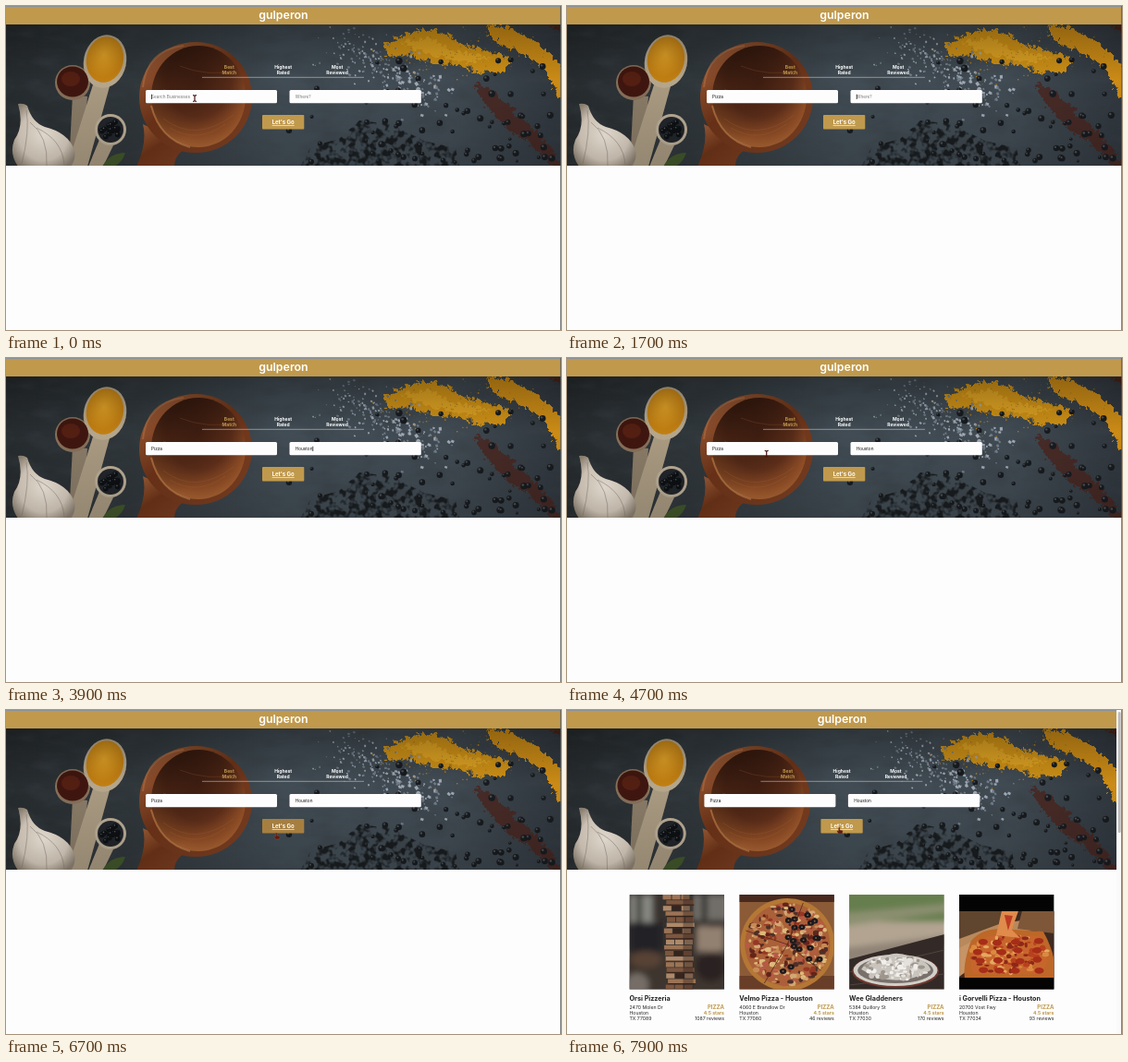
Write an HTML page that moves like this. It is 600 by 351 pixels and loops after 8000 ms.

```html
<!DOCTYPE html>
<html lang="en">
<head>
<meta charset="utf-8">
<title>Restaurant search</title>
<style>
  html, body { margin: 0; width: 100%; height: 100%; overflow: hidden; background: #fdfdfd; }
  svg { display: block; width: 100%; height: 100%; font-family: Inter, "Open Sans", sans-serif; }
  .mid { text-anchor: middle; }
  .end { text-anchor: end; }
  .bold { font-weight: 700; }
  .gold { fill: #c0994c; }
</style>
</head>
<body>
<svg viewBox="0 0 600 351" preserveAspectRatio="none">
  <defs>
    <linearGradient id="slate">
      <stop offset="0" stop-color="#262b2e"/><stop offset=".25" stop-color="#30373b"/>
      <stop offset=".5" stop-color="#414c54"/><stop offset=".8" stop-color="#414b53"/>
      <stop offset="1" stop-color="#2f363d"/>
    </linearGradient>
    <linearGradient id="shade" x2="0" y2="1">
      <stop offset="0" stop-color="#000" stop-opacity=".28"/><stop offset=".4" stop-color="#000" stop-opacity="0"/>
      <stop offset="1" stop-color="#000" stop-opacity=".12"/>
    </linearGradient>
    <radialGradient id="bowl" cx=".5" cy=".36" r=".68">
      <stop offset="0" stop-color="#4f2615"/><stop offset=".5" stop-color="#65321c"/>
      <stop offset=".8" stop-color="#935027"/><stop offset="1" stop-color="#b06a38"/>
    </radialGradient>
    <linearGradient id="bowlShadow" x1=".15" y1="0" x2=".6" y2=".8">
      <stop offset="0" stop-color="#210f09" stop-opacity=".85"/><stop offset="1" stop-color="#210f09" stop-opacity="0"/>
    </linearGradient>
    <linearGradient id="rim" x2=".8" y2="1">
      <stop offset="0" stop-color="#a0603a"/><stop offset=".5" stop-color="#6c3318"/><stop offset="1" stop-color="#7b3f22"/>
    </linearGradient>
    <radialGradient id="garlic" cx=".5" cy=".5" r=".6">
      <stop offset="0" stop-color="#f0e8dc"/><stop offset=".65" stop-color="#d5cabc"/><stop offset="1" stop-color="#8b8071"/>
    </radialGradient>
    <radialGradient id="turmeric" cx=".45" cy=".4">
      <stop offset="0" stop-color="#e2a227"/><stop offset="1" stop-color="#c17f12"/>
    </radialGradient>
    <filter id="grain" x="0" y="0" width="1" height="1">
      <feTurbulence type="fractalNoise" baseFrequency=".025 .06" numOctaves="4" seed="4"/>
      <feColorMatrix values="0 0 0 0 .04  0 0 0 0 .05  0 0 0 0 .06  1.2 0 0 0 -.5"/>
    </filter>
    <filter id="crumble">
      <feTurbulence baseFrequency=".13" numOctaves="3" seed="8"/>
      <feDisplacementMap in="SourceGraphic" scale="11" xChannelSelector="R" yChannelSelector="G"/>
    </filter>
    <filter id="mottle">
      <feTurbulence type="fractalNoise" baseFrequency=".14" numOctaves="2" seed="3"/>
      <feColorMatrix values="0 0 0 0 0  0 0 0 0 0  0 0 0 0 0  5 0 0 0 -2.2"/>
      <feComposite in="SourceGraphic" operator="in"/>
    </filter>
    <filter id="blur"><feGaussianBlur stdDeviation="3"/></filter>
    <clipPath id="heroClip"><rect y="20" width="600" height="153"/></clipPath>
    <clipPath id="photoClip"><rect width="102.5" height="102.5"/></clipPath>
  </defs>

  <rect width="600" height="351" fill="#fdfdfd"/>
  <g id="hero"><g clip-path="url(#heroClip)">
    <rect y="20" width="600" height="153" fill="url(#slate)"/>
    <rect y="20" width="600" height="153" filter="url(#grain)"/>
    <path d="M318 174l12-22 30-8 22-20 34 4 36 18 34 8 4 20z" filter="url(#mottle)" opacity=".6"/>
    <g filter="url(#crumble)">
      <path d="M408 40l17-10 20-7 27 4 20 13 28 6 25 9-8 14-31 1-21-9-27-1-27-10-22 2z" fill="#cd9015"/>
      <path d="M425 37l30-5 24 14 44 8-20 5-47-9z" fill="#dca123"/>
      <path d="M516 18l26 3 28 14 20 18 16 21v34l-13-16-13-24-24-19-20-7-16-12z" fill="#cb8b13"/>
      <path d="M586 18h20v12z" fill="#4b2119"/>
      <path d="M504 80l22 10 26 26 25 24 27 32h-14l-29-28-26-16-24-30z" fill="#4b221a" opacity=".75"/>
    </g>
    <g id="grains"></g>

    <path d="M148 128q5 20-7 46h41q0-16 18-21z" fill="url(#rim)"/>
    <ellipse cx="205" cy="99" rx="61" ry="60" fill="url(#rim)"/>
    <ellipse cx="208" cy="98" rx="51" ry="55" fill="url(#bowl)"/>
    <ellipse cx="208" cy="98" rx="51" ry="55" fill="url(#bowlShadow)"/>
    <g fill="none" stroke="#c07440" opacity=".2">
      <path d="M170 122q35 27 76-4M177 132q30 18 60-4M188 65q30 12 60 5M170 90q40 17 85 5"/>
    </g>
    <path d="M148 88q4-40 44-45" fill="none" stroke="#ad7048" stroke-width="2" opacity=".6"/>
    <path d="M157 108q9 36 42 45" fill="none" stroke="#c98751" stroke-width="2" opacity=".6"/>

    <g id="spoons">
      <path d="M72 96L88 98 82 174H68z" fill="#897b67"/>
      <path d="M95 82L112 87 88 174H66z" fill="#a99a81"/>
      <ellipse cx="72" cy="83" rx="19" ry="19" fill="#86705a"/>
      <ellipse cx="107" cy="60" rx="23" ry="29" fill="#b5a68c" transform="rotate(12 107 60)"/>
      <path d="M101 145L116 151 105 174H89z" fill="#a6977f"/>
      <circle cx="113" cy="134" r="17" fill="#b9ac96"/>
    </g>
    <use href="#spoons" filter="url(#mottle)" opacity=".35"/>
    <ellipse cx="72" cy="82" rx="17" ry="16.5" fill="#3f160f"/>
    <ellipse cx="70" cy="79" rx="10" ry="8" fill="#541f13"/>
    <ellipse cx="107" cy="58" rx="20" ry="25" fill="url(#turmeric)" transform="rotate(12 107 58)"/>
    <circle cx="113" cy="134" r="14" fill="#22252a"/>
    <g id="corns"></g>
    <path d="M104 174q8-15 25-15-4 12-13 15z" fill="#40552b"/>
    <path d="M13 106q6-1 10 2 5 18 19 23 25 6 32 25 2 12-5 19H14Q3 161 9 145q11-15 4-39z" fill="url(#garlic)"/>
    <path d="M22 113q4 22-5 58M26 126q20 15 18 48M33 132q28 13 30 40" fill="none" stroke="#82766a" opacity=".5"/>
    <rect y="20" width="600" height="153" fill="url(#shade)"/>
  </g></g>

  <rect id="header" class="gold" width="600" height="20"/>
  <rect width="600" height="1" fill="#88929a"/>

  <g id="form">
    <text class="mid" x="300" y="14" font-size="12.4" font-weight="600" fill="#fff">gulperon</text>
    <g id="tabs" class="mid bold" font-size="5" fill="#fff"></g>
    <path d="M212 77.3H387" stroke="#fff" stroke-width=".7" opacity=".6"/>
    <g fill="#fdfdfd"><rect x="151" y="91" width="142" height="14.3" rx="1.5"/><rect x="306.5" y="91" width="142.3" height="14.3" rx="1.5"/></g>
    <g font-size="4.7"><text id="term" x="157" y="100"/><text id="place" x="312.8" y="100"/></g>
    <rect id="caret" y="95.7" width=".8" height="5.3" fill="#222"/>
    <rect id="button" x="277" y="118" width="45.3" height="15.5" rx="1"/>
    <text class="mid bold" x="299.7" y="128" font-size="6" fill="#fff" text-decoration="underline">Let's Go</text>
  </g>

  <g id="results"></g>
  <g id="scrollbar">
    <rect x="594" width="6" height="351" fill="#fafafa"/>
    <rect x="595.7" y="2" width="3" height="131" rx="1.5" fill="#bcbcbc"/>
  </g>
  <path d="M599.6 0V351" stroke="#55585a" stroke-width=".8"/>
  <path id="beam" d="M-2-3.3Q0-3.3 0-2.2 0-3.3 2-3.3M0-2.2V2.2M-2 3.3Q0 3.3 0 2.2 0 3.3 2 3.3" fill="none" stroke="#481412" stroke-width="1.2"/>
  <path id="hand" d="M-1.5-3.5q1-1 1.4 0V-1l2.6.6q.8.3.6 1.2L2.5 3h-4L-3.1.4q0-1 1.6-.2z" fill="#5b1c14" stroke="#a4673c" stroke-width=".3"/>
</svg>

<script>
const $ = id => document.getElementById(id);
const LOOP = 8000;
const RESULTS_AT = 7000;

function seeded(seed) {
  return () => (seed = (seed * 16807) % 2147483647) / 2147483647;
}
const repeat = (count, draw) => Array.from({ length: count }, (_, i) => draw(i)).join('');
const rect = (x, y, w, h, fill, extra = '') =>
  `<rect x="${x}" y="${y}" width="${w}" height="${h}" fill="${fill}" ${extra}/>`;
const dot = (x, y, r, fill, ry = r) =>
  `<ellipse cx="${x}" cy="${y}" rx="${r}" ry="${ry}" fill="${fill}"/>`;
const shape = (d, fill, extra = '') => `<path d="${d}" fill="${fill}" ${extra}/>`;
const blurred = content => `<g filter="url(#blur)">${content}</g>`;

function scatterSpices() {
  const rnd = seeded(719);
  const bell = () => rnd() + rnd() + rnd() - 1.5;
  const salt = repeat(240, () => {
    const along = rnd();
    const x = 365 + along * 98 + bell() * 30, y = 42 + along * 58 + bell() * 24;
    const s = 1 + rnd() * (1.4 + along * 2);
    return rect(x, y, s, s * 0.8, rnd() > 0.4 ? '#9ea8b4' : '#717c88', `transform="rotate(${rnd() * 90} ${x} ${y})"`);
  });
  const pepper = repeat(75, () => {
    const x = 270 + 325 * Math.sqrt(rnd()), y = 32 + 138 * Math.sqrt(rnd()), r = 1.5 + rnd() * 2.3;
    return dot(x, y, r, '#171b1f') + dot(x - r * 0.3, y - r * 0.35, r * 0.35, '#4a4d50');
  });
  const dust = repeat(100, () => dot(490 + bell() * 80, 55 + bell() * 28, 0.3 + rnd() * 0.6, '#ad7b20'));
  $('grains').innerHTML = salt + dust + pepper;
  $('corns').innerHTML = repeat(22, () => {
    const a = rnd() * 6.3, d = rnd() * 11, x = 113 + d * Math.cos(a), y = 134 + d * Math.sin(a);
    return dot(x, y, 2.8, '#0e1114') + dot(x - 0.8, y - 1, 0.8, '#56585a');
  });
}

function towerPhoto() {
  const rnd = seeded(45);
  const room = rect(0, 0, 103, 103, '#38322f') + blurred(
    rect(0, 0, 26, 30, '#85867f') + rect(8, 0, 5, 34, '#2b2827') + rect(68, 0, 40, 28, '#716e69') +
    rect(78, 0, 6, 45, '#332d2b') + rect(0, 30, 36, 32, '#242225') + rect(72, 34, 31, 28, '#92806f') +
    rect(0, 66, 103, 40, '#3d342e') + dot(18, 70, 17, '#594334', 9) + dot(88, 78, 16, '#292322') + dot(8, 98, 13, '#756d66'));
  return room + repeat(17, i => {
    const y = i * 6.1, x = 36 + i * 0.15 + rnd() * 4;
    const tone = ['#9b7355', '#7d563f', '#ad896a'][i % 3];
    return i % 2
      ? rect(x, y, 30, 5.5, tone) + rect(x, y + 4.5, 30, 1.2, '#38251c')
      : repeat(3, k => rect(x + k * 10, y, 9, 5.3, k === 1 && i % 4 ? '#35251d' : tone));
  }) + rect(58, 0, 11, 103, '#261b17', 'opacity=".35"');
}

function toppings(rnd, cx, cy, radius, count, colors, squash = 1) {
  return repeat(count, i => {
    const a = rnd() * 6.3, d = radius * Math.sqrt(rnd());
    return dot(cx + d * Math.cos(a), cy + d * Math.sin(a) * squash, 1 + rnd() * 3, colors[i % colors.length], 1 + rnd() * 2);
  });
}

function olivePhoto() {
  const rnd = seeded(87);
  return rect(0, 0, 103, 103, '#8b5a37') + rect(0, 0, 103, 8, '#48291d') + rect(0, 88, 103, 15, '#693e28') +
    dot(52, 54, 51, '#b47735', 50) + dot(52, 54, 46, '#aa6038', 45) +
    toppings(rnd, 52, 54, 44, 310, ['#ddba7b', '#953724', '#c68b56', '#642419', '#d3a675', '#b75a45', '#4d3028']) +
    repeat(20, () => {
      const a = rnd() * 6.3, d = 39 * Math.sqrt(rnd()), x = 52 + d * Math.cos(a), y = 53 + d * Math.sin(a);
      return dot(x, y, 3.6, '#1c191d', 3) + dot(x, y, 0.9, '#876448');
    }) +
    shape('M52 54L7 39M52 54L27 96M52 54L88 82M52 54L69 9', 'none', 'stroke="#50281c" stroke-width=".8"');
}

function platePhoto() {
  const rnd = seeded(31);
  return rect(0, 0, 103, 103, '#b2a491') +
    blurred(rect(-5, -5, 113, 34, '#667e4e') + shape('M-5 20L108 10V18L-5 34z', '#8c9071') +
      shape('M-5 58L108 44V55L-5 74z', '#8f8376')) +
    shape('M0 70L103 43V103H0z', '#332a27') +
    shape('M0 84L103 60M0 98L103 86', 'none', 'stroke="#51443d"') +
    dot(50, 83, 47, '#70382f', 18) + dot(50, 82, 45.5, '#d3cfc9', 17) + dot(50, 82, 41, '#78706a', 14) +
    shape('M13 81Q21 68 37 68 50 60 65 67 87 72 88 82 50 104 13 81z', '#c9c5be') +
    toppings(rnd, 50, 80, 34, 120, ['#f1efec', '#9e968d', '#e5e1dc', '#c9c3bc'], 0.38);
}

function boxPhoto() {
  const rnd = seeded(63);
  return rect(0, 0, 103, 103, '#050404') + rect(0, 18, 103, 72, '#3d2a21') +
    shape('M0 18H49L39 39 0 52z', '#60452f') + shape('M0 48L43 32 103 22V33L60 43 0 61z', '#b8895c') +
    shape('M68 18H103V42L63 37z', '#7e5739') + shape('M0 58L13 51 8 83 0 89z', '#c59467') +
    shape('M13 50Q24 37 46 37L91 40Q100 56 103 72V90H6Q4 74 13 50z', '#bd6728') +
    shape('M17 53Q30 42 51 43L86 45 96 72 88 86H15Q9 72 17 53z', '#c7662c') +
    toppings(rnd, 54, 65, 42, 125, ['#db8b40', '#b9401e', '#e5a861', '#8d2818'], 0.5) +
    repeat(16, i => dot(20 + (i % 4) * 20 + rnd() * 7, 50 + (i >> 2) * 10 + rnd() * 3, 5, '#a62d18', 3.3)) +
    shape('M46 18H64L57 38 66 47 40 44z', '#df8b4c') + shape('M49 22l9 1-5 16z', '#bd3b22') +
    rect(0, 90, 103, 13, '#050404');
}

const restaurants = [
  ['Orsi Pizzeria', '2470 Molen Dr', 'TX 77089', 1087, towerPhoto],
  ['Velmo Pizza - Houston', '4060 E Brandlow Dr', 'TX 77080', 46, olivePhoto],
  ['Wee Gladdeners', '5384 Quillory St', 'TX 77030', 170, platePhoto],
  ['i Gorvelli Pizza - Houston', '20700 Vost Fwy', 'TX 77034', 93, boxPhoto],
];

function card([name, street, zip, reviews, photo], i) {
  const line = (x, y, size, text, cls = '') => `<text x="${x}" y="${y}" font-size="${size}" class="${cls}">${text}</text>`;
  return `<g transform="translate(${67.5 + i * 118.8} 200)" fill="#222">
    <g clip-path="url(#photoClip)">${photo()}</g>
    ${line(0, 114.6, 7.2, name, 'bold')}
    ${line(0, 124, 5.2, street)}${line(0, 130, 5.2, 'Houston')}${line(0, 136, 5.2, zip)}
    ${line(102.5, 124.2, 6, 'PIZZA', 'end bold gold')}
    ${line(102.5, 130, 5.2, '4.5 stars', 'end bold gold')}
    ${line(102.5, 136, 5.2, reviews + ' reviews', 'end')}
  </g>`;
}

scatterSpices();
$('results').innerHTML = restaurants.map(card).join('');
$('tabs').innerHTML = [['Best', 'Match'], ['Highest', 'Rated'], ['Most', 'Reviewed']].map((words, i) =>
  words.map((word, row) =>
    `<text x="${241.3 + i * 58.4}" y="${68 + row * 6}" ${i ? '' : 'class="gold"'}>${word}</text>`).join('')).join('');

const fields = [
  { node: $('term'), text: 'Pizza', hint: 'Search Businesses', focus: 0, start: 600, step: 180, blur: 1600 },
  { node: $('place'), text: 'Houston', hint: 'Where?', focus: 1600, start: 2300, step: 250, blur: 5400 },
];

// Pointer keyframes: time, x, y
const pointerPath = [[0, 204, 100], [4500, 204, 100], [5400, 296, 129], [5900, 296, 129], [6500, 293, 137], [7000, 293, 137], [7600, 295, 131], [LOOP, 295, 131]];

function pointerAt(t) {
  const i = pointerPath.findIndex(key => key[0] > t);
  const [t0, x0, y0] = pointerPath[i - 1], [t1, x1, y1] = pointerPath[i];
  const u = (t - t0) / (t1 - t0), ease = u * u * (3 - 2 * u);
  return [x0 + (x1 - x0) * ease, y0 + (y1 - y0) * ease];
}

const show = (id, visible) => $(id).setAttribute('visibility', visible ? 'visible' : 'hidden');

function drawField({ node, text, hint, focus, start, step, blur }, t) {
  const count = Math.min(text.length, Math.max(0, Math.floor((t - start) / step) + 1));
  const value = count ? text.slice(0, count) : hint;
  if (node.textContent !== value) node.textContent = value;
  node.setAttribute('fill', count ? '#111' : '#777');
  if (t < focus || t >= blur) return;
  const lastInput = count ? start + (count - 1) * step : focus;
  const width = count ? node.getComputedTextLength() : 0;
  $('caret').setAttribute('x', +node.getAttribute('x') + width);
  show('caret', (t - lastInput) % 1000 < 500);
}

function draw(t) {
  const loaded = t >= RESULTS_AT;
  show('results', loaded);
  show('scrollbar', loaded);
  $('hero').setAttribute('transform', loaded ? 'scale(.99 1)' : '');
  $('header').setAttribute('width', loaded ? 594 : 600);
  $('form').setAttribute('transform', loaded ? 'translate(-2.6 0)' : '');

  show('caret', false);
  fields.forEach(field => drawField(field, t));

  const [x, y] = pointerAt(t);
  const overButton = t >= 5200;
  $('button').setAttribute('fill', overButton && !loaded ? '#a67f40' : '#c0994c');
  show('beam', t < fields[0].start || (t >= 4600 && !overButton));
  show('hand', overButton && (!loaded || t >= 7600));
  for (const id of ['beam', 'hand']) $(id).setAttribute('transform', `translate(${x} ${y})`);
}

const begin = performance.now();
function tick() {
  draw((performance.now() - begin) % LOOP);
  requestAnimationFrame(tick);
}
tick();
</script>
</body>
</html>
```
